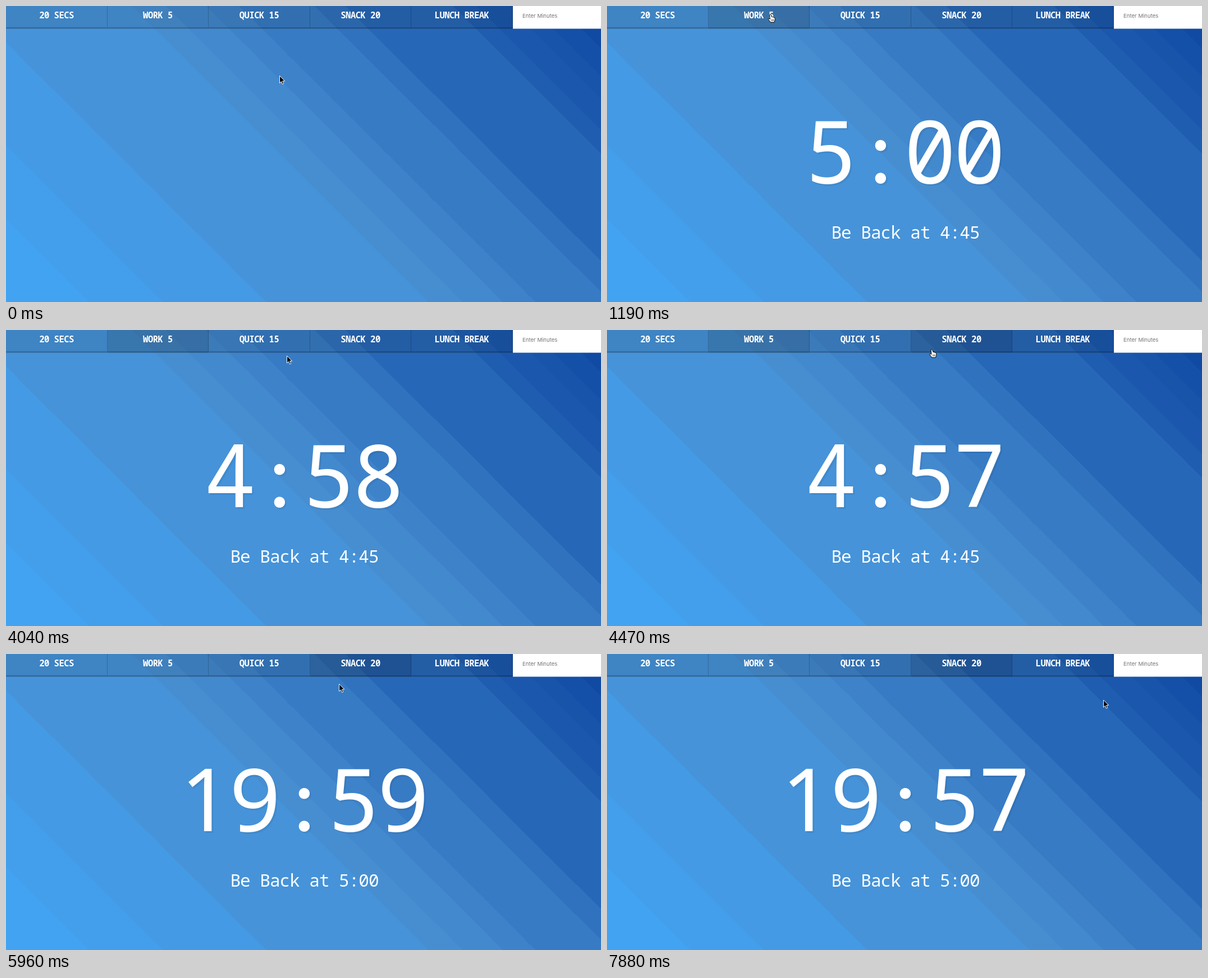
These frames come from a looping animation (1060 px wide and 528 px high, 8000 ms). An HTML page:

```html
<!DOCTYPE html>
<html lang="en">
<head>
<meta charset="utf-8">
<title>Countdown timer</title>
<style>
  html, body { margin: 0; height: 100%; overflow: hidden; }
  svg { display: block; width: 100vw; height: 100vh; }
  text { font-family: "Noto Sans Mono", "DejaVu Sans Mono", monospace; letter-spacing: -.03226em; fill: #fff; white-space: pre; }
  #nav text { font-size: 15.5px; font-weight: 600; }
  #left { font-size: 155px; letter-spacing: 0; text-anchor: middle; text-shadow: 3px 3px 0 rgba(0, 0, 0, .06); }
  #left .one { font-family: "Noto Sans", "Open Sans", sans-serif; }
  #left .colon { font-family: Lato, sans-serif; }
  #back { font-size: 31px; }
  #nav .hint { font: 9.6px Inter, "Liberation Sans", sans-serif; letter-spacing: 0; fill: #757575; }
</style>
</head>
<body>
<svg id="stage" viewBox="0 0 1060 528">
  <g id="nav"></g>
  <text id="left" y="316"></text>
  <text id="back" x="399.5" y="414.5"></text>
  <g id="cursor">
    <path id="arrow" d="M0 0V13L3 10.3L5 15L7.2 14L5.2 9.4H9.2Z" fill="#000" stroke="#fff"/>
    <g id="hand" stroke="#000" stroke-linejoin="round">
      <path d="M-1.9 1.2Q-.6 -.6 .8 1L2 5Q3.2 4.2 4 5.4Q5.2 4.8 6 6Q7.8 5.8 7.8 8V10.5L6.5 14.5H-.2L-4 9.6Q-4.6 7.6 -2.6 7.8L-1 9Z" fill="#fff"/>
      <path d="M1.7 9.2V12.2M3.6 9.2V12.2M5.4 9.2V12.2" stroke-width=".7"/>
    </g>
    <g id="beam" fill="none">
      <path d="M-2.5 -6Q0 -6 0 -4V4Q0 6 -2.5 6M2.5 -6Q0 -6 0 -4M0 4Q0 6 2.5 6M-1.5 1.5H1.5" stroke="#fff" stroke-opacity=".5" stroke-width="2.4"/>
      <path d="M-2.5 -6Q0 -6 0 -4V4Q0 6 -2.5 6M2.5 -6Q0 -6 0 -4M0 4Q0 6 2.5 6M-1.5 1.5H1.5" stroke="#111"/>
    </g>
  </g>
</svg>
<script>
const $ = id => document.getElementById(id);
const LOOP = 8000, STEP = 147, CELL = 180.5, NAV = 40.5;

// Diagonal bands: each takes the gradient's colour at its middle.
const edges = [-528, -380, -248, -65, 225, 285, 357, 415, 550, 605, 796, 838, 895, 935, 985, 1060];
const [light, mid, dark] = [[66, 165, 245], [71, 142, 209], [13, 71, 161]];
const place = u => (u + 528) / 1588;
function shade(p) {
  const [a, b, k] = p < .5 ? [light, mid, p * 2] : [mid, dark, p * 2 - 1];
  return `rgb(${a.map((v, i) => Math.round(v + (b[i] - v) * k))})`;
}
const bands = edges.slice(1).map((end, i) => {
  const a = place(edges[i]), b = place(end);
  return `${shade((a + b) / 2)} ${a * 100}% ${b * 100}%`;
});
$("stage").style.background = `linear-gradient(45deg, ${bands})`;

const labels = ["20 SECS", "WORK 5", "QUICK 15", "SNACK 20", "LUNCH BREAK"];
$("nav").innerHTML = labels.map((label, i) => {
  const x = Math.round(i * CELL), w = Math.round((i + 1) * CELL) - x;
  return `<rect class="button" x="${x}" width="${w}" height="${NAV}"/>
    <path d="M${x} 39.2H${x + w}" stroke="#000" stroke-opacity=".2" stroke-width="2.6"/>
    <path d="M${x + w - .5} 0V38" stroke="#000" stroke-opacity=".2"/>
    <text x="${(i + .5) * CELL - 4.4 * label.length - .25}" y="22.3">${label}</text>`;
}).join("") + `<rect x="903" width="157" height="${NAV}" fill="#fff"/>
  <text class="hint" x="920" y="21">Enter Minutes</text>`;
const buttons = document.querySelectorAll(".button");

// Values that switch at a given time: [start, value]
const clock = [[0, ""], [1190, "5:00"], [2240, "4:59"], [3140, "4:58"], [4180, "4:57"],
  [4910, "20:00"], [5960, "19:59"], [6840, "19:58"], [7880, "19:57"]];
const backAt = [[0, ""], [1190, "Be Back at 4:45"], [4910, "Be Back at 5:00"]];
const focus = [[0, -1], [890, 1], [4770, 3]];
const at = (list, t) => list.filter(([start]) => t >= start).pop()[1];

// Each character sits in the middle of its own 88 px cell.
const glyphClass = { "1": "one", ":": "colon" };
const spaced = str => [...str].map((c, i) =>
  `<tspan class="${glyphClass[c] || ""}" x="${531.5 + 88 * (i - (str.length - 1) / 2)}">${c}</tspan>`).join("");

// Pointer moves: start, number of steps, end point
const moves = [[450, 4, 291.5, 14.5], [3590, 4, 500.5, 46], [4178, 3, 579, 34.5],
  [5960, 7, 681, 168], [7290, 3, 858, 88], [7880, 1, 884.5, 82]];
function pointer(t) {
  let x = 487.5, y = 124.5;
  for (const [start, steps, toX, toY] of moves) {
    if (t < start) break;
    const k = Math.min(1, (Math.floor((t - start + 2) / STEP) + 1) / steps);
    x += (toX - x) * k;
    y += (toY - y) * k;
  }
  return [x, y];
}

let shown;
function draw(now) {
  const t = now % LOOP, [x, y] = pointer(t);
  const over = y < NAV ? Math.floor(x / CELL) : -1;
  const active = at(focus, t), left = at(clock, t);
  buttons.forEach((b, i) => b.setAttribute("fill-opacity", i === over || i === active ? .2 : .1));
  if (left !== shown) $("left").innerHTML = spaced(shown = left);
  $("back").textContent = at(backAt, t);
  const shape = over >= 0 ? "hand" : left && y > 150 ? "beam" : "arrow";
  for (const id of ["arrow", "hand", "beam"]) $(id).style.display = id === shape ? "" : "none";
  $("cursor").setAttribute("transform", `translate(${x} ${y})`);
}

const begin = performance.now();
function tick() {
  draw(performance.now() - begin);
  requestAnimationFrame(tick);
}
tick();
</script>
</body>
</html>
```
